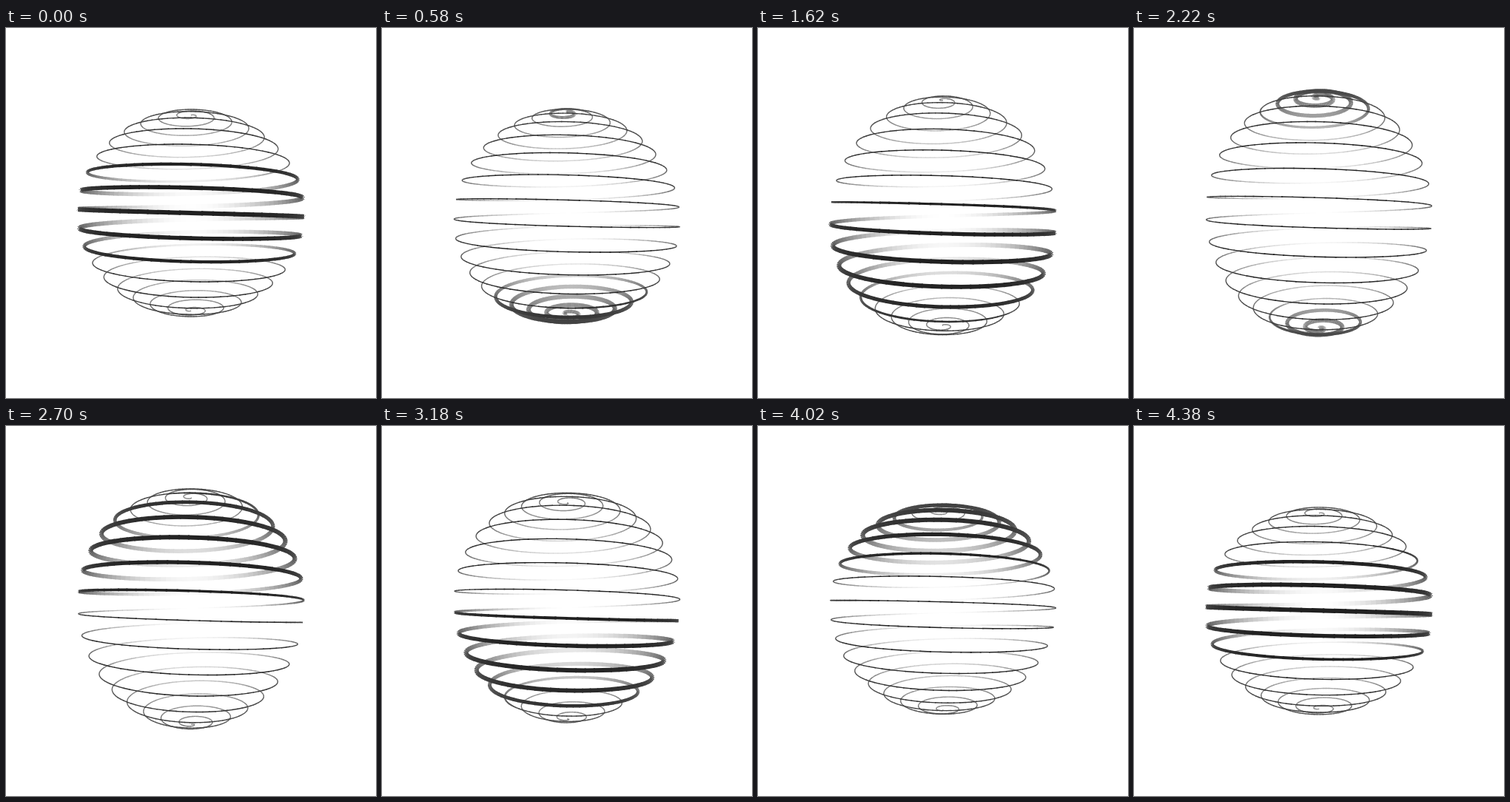
An HTML page with a canvas for the animation above (4.4 s loop, 500x500 px).

```html
<!DOCTYPE html>
<html lang="en">
<head>
<meta charset="utf-8">
<title>Breathing spiral sphere</title>
<style>
  html, body { margin: 0; width: 100%; height: 100%; overflow: hidden; background: #fff; }
  canvas { display: block; width: 500px; height: 500px; }
</style>
</head>
<body>
<canvas id="stage" width="500" height="500"></canvas>
<script>
const ctx = document.getElementById('stage').getContext('2d');
const LOOP = 4400;
const TAU = Math.PI * 2;
const CENTER = 250;
const RADIUS = 144;
const CAMERA = RADIUS * 3;
const TURNS = 18;
const STEPS = TURNS * 90;
const SWAY = 12;
const BAND_GAP = 17.2;     // distance between thick bands, in turns
const BAND_REACH = 2.7;
const THIN = 1.4, THICK = 6;

// Point on the spiral: u runs from the top pole (0) to the bottom pole (1).
function project(u, progress) {
  const polar = Math.PI * u;
  const turn = TAU * (TURNS * u - progress);
  const ring = RADIUS * Math.sin(polar);
  const z = ring * Math.cos(turn);
  const y = -RADIUS * Math.cos(polar) + SWAY * Math.cos(TAU * progress - polar);
  const scale = CAMERA / (CAMERA - z);
  return { x: CENTER + ring * Math.sin(turn) * scale, y: CENTER + y * scale, z };
}

// Thick bands travel downwards, three per loop.
function lineWidth(u, progress) {
  const offset = (TURNS * (u - 0.5)) / BAND_GAP - 3 * progress;
  const distance = (offset - Math.round(offset)) * BAND_GAP;
  const bulge = Math.max(0, 1 - (distance / BAND_REACH) ** 2);
  return THIN + (THICK - THIN) * bulge ** 0.6;
}

function shade(z) {
  const depth = Math.min(1, Math.max(0, (1 - z / RADIUS) / 2));
  const level = Math.round(32 + 223 * depth ** 1.4);
  return `rgb(${level},${level},${level})`;
}

function draw(progress) {
  ctx.fillStyle = '#fff';
  ctx.fillRect(0, 0, 500, 500);

  const segments = [];
  let a = project(0, progress);
  for (let i = 1; i <= STEPS; i++) {
    const b = project(i / STEPS, progress);
    segments.push({ a, b, z: (a.z + b.z) / 2, width: lineWidth((i - 0.5) / STEPS, progress) });
    a = b;
  }
  segments.sort((p, q) => p.z - q.z);

  for (const { a, b, z, width } of segments) {
    // a slight overlap hides the seams
    const dx = (b.x - a.x) * 0.08, dy = (b.y - a.y) * 0.08;
    ctx.strokeStyle = shade(z);
    ctx.lineWidth = width;
    ctx.beginPath();
    ctx.moveTo(a.x - dx, a.y - dy);
    ctx.lineTo(b.x + dx, b.y + dy);
    ctx.stroke();
  }
}

let start;
function frame(now) {
  start ??= now;
  draw(((now - start) % LOOP) / LOOP);
  requestAnimationFrame(frame);
}
draw(0);
requestAnimationFrame(frame);
</script>
</body>
</html>
```
